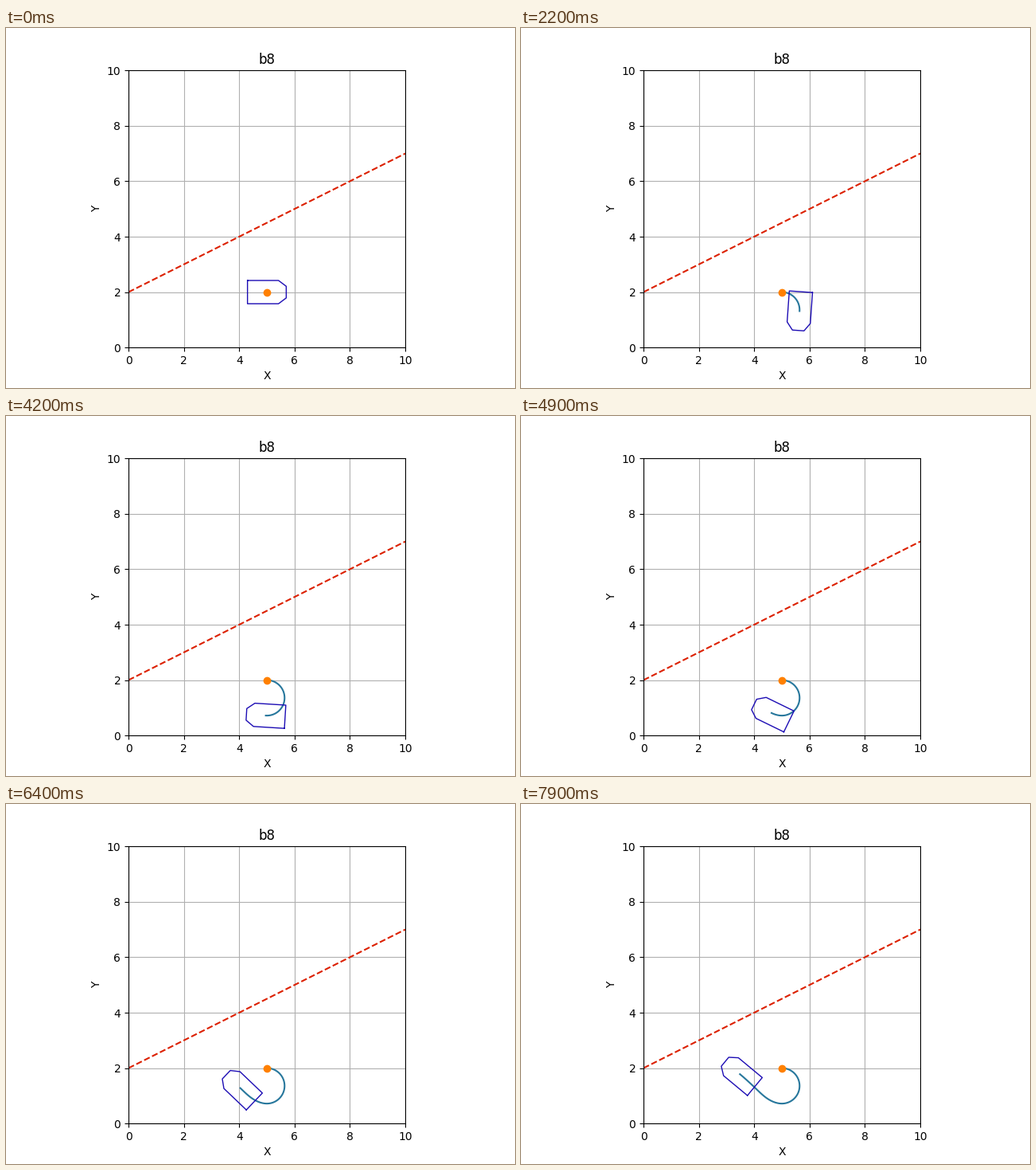
Recreate the animation shown at these times as a matplotlib script. Size 640x452 px, loop 8 s.

```python
import numpy as np
import matplotlib.pyplot as plt
from matplotlib.animation import FuncAnimation

W, H, DPI = 640, 452, 100
FRAMES, INTERVAL = 80, 100
START = (5, 2)
STEP = 0.05            # distance per frame
TURN = STEP / 0.64     # turn per frame at full rudder

# Hull outline in boat coordinates, bow towards +x
HULL = np.array([(-0.7, 0.42), (0.42, 0.42), (0.7, 0.21), (0.7, -0.21),
                 (0.42, -0.42), (-0.7, -0.42), (-0.7, 0.42)])


def sail():
    """Full rudder first, then ease onto a straight course and drift back."""
    k = np.arange(FRAMES - 1)
    full = np.degrees(TURN)
    rate = np.interp(k, [0, 40, 42, 55, 60, 63, 78],
                     [full, full, 3.5, 1.3, 0, -0.1, -0.45])
    turn = -np.radians(rate)
    heading = np.concatenate([[0], np.cumsum(turn)])
    mid = heading[:-1] + turn / 2
    x = START[0] + np.concatenate([[0], np.cumsum(STEP * np.cos(mid))])
    y = START[1] + np.concatenate([[0], np.cumsum(STEP * np.sin(mid))])
    return x, y, heading


def hull_at(x, y, a):
    c, s = np.cos(a), np.sin(a)
    return HULL @ np.array([[c, s], [-s, c]]) + (x, y)


xs, ys, headings = sail()

# The tiny margin keeps the pixel size from rounding down
fig = plt.figure(figsize=((W + 1e-4) / DPI, (H + 1e-4) / DPI), dpi=DPI,
                 facecolor="white")
ax = fig.add_axes([154 / W, (H - 401.2) / H, 348 / W, 348 / H])
ax.set(xlim=(0, 10), ylim=(0, 10), xlabel="X", ylabel="Y", title="b8")
ax.set_xticks(range(0, 11, 2))
ax.set_yticks(range(0, 11, 2))
ax.grid(True)

ax.plot([0, 10], [2, 7], "--", color="#dc2000", lw=1.5)
trail, = ax.plot([], [], color="#27779c", lw=1.5)
hull, = ax.plot([], [], color="#1c0cb4", lw=1)
ax.plot(*START, "o", color="#ff8000", ms=6)


def update(frame):
    k = max(frame - 1, 0)
    trail.set_data(xs[:k + 1], ys[:k + 1])
    hull.set_data(*hull_at(xs[k], ys[k], headings[k]).T)
    return trail, hull


anim = FuncAnimation(fig, update, frames=FRAMES, interval=INTERVAL,
                     init_func=lambda: update(0), repeat=True, repeat_delay=0)
plt.show()
```
